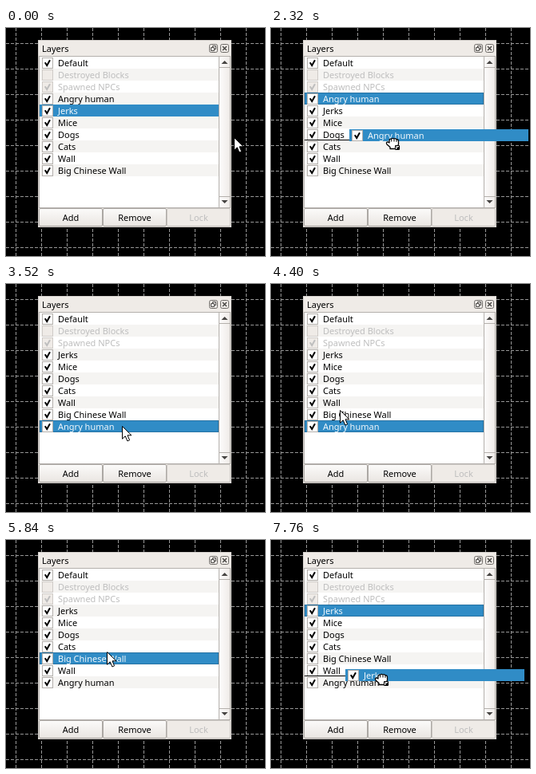
These frames come from a looping animation (324x286 px, 8 s). An HTML page:

```html
<!DOCTYPE html>
<html lang="en">
<head>
<meta charset="utf-8">
<title>Layers panel</title>
<style>
  html, body { margin: 0; width: 100%; height: 100%; overflow: hidden; background: #000; }
  #stage {
    position: relative; width: 324px; height: 286px; overflow: hidden; background: #000;
    font: 11px/15px "Noto Sans", "Open Sans", sans-serif; color: #000; cursor: default;
  }
  #stage div, #stage svg { position: absolute; box-sizing: border-box; }
  #grid { left: 0; top: 0; }
  #grid path { fill: none; stroke: #969696; stroke-dasharray: 4 2; }
  #dock { left: 40px; top: 15px; width: 242px; height: 235px; background: #efebe7; border: 1px solid #d6d2ce; }
  #title { left: 45px; top: 18px; }
  #titleLine { left: 41px; top: 35px; width: 240px; height: 1px; background: #b4b0ac; }
  #tools { left: 253px; top: 19px; }
  #list { left: 41px; top: 36px; width: 225px; height: 190px; background: #fff; border-left: 1px solid #b4b0ac; border-bottom: 1px solid #b4b0ac; }
  .row { left: 42px; width: 224px; height: 15px; padding-left: 23px; white-space: pre; }
  .row.alt { background: #f5f4f2; }
  .row.off { color: #bebebe; }
  .row.on { background: #308cc6; color: #f2f8fc; }
  .row.focus { box-shadow: inset 0 0 0 1px #2672a3; }
  .box { left: 3px; top: 1px; width: 14px; height: 14px; background: #fff; border: 1px solid #b3afab; }
  .off .box { background: #efebe7; border-color: #cfcbc7; }
  .box svg { left: 0; top: 0; }
  .box path { fill: none; stroke: #000; stroke-width: 2; }
  .off .box path { stroke: #bebebe; }
  .empty svg { display: none; }
  #bar { left: 266px; top: 36px; width: 15px; height: 190px; background: #f3f0ed; border: 1px solid #b4b0ac; border-top: 0; }
  #bar div { left: 0; width: 13px; background: linear-gradient(90deg, #fdfcfc, #efebe8); }
  #bar svg { left: 0; top: 0; }
  .btn { top: 226px; height: 23px; text-align: center; line-height: 22px; border: 1px solid #aca8a4; border-radius: 2px; background: linear-gradient(#fbfaf9, #eae6e2); }
  .btn.off { color: #bebebe; border-color: #cbc7c3; background: #efebe7; }
  #mark { left: 42px; width: 224px; height: 1px; background: #000; }
  #pointer { left: 0; top: 0; overflow: visible; }
</style>
</head>
<body>
<div id="stage">
  <svg id="grid" width="324" height="286"><path/></svg>
  <div id="dock"></div>
  <div id="title">Layers</div>
  <div id="titleLine"></div>
  <svg id="tools" width="28" height="14" fill="none" stroke="#4b4947">
    <rect x="1.5" y="1.5" width="10" height="10" rx="2" stroke="#6e6b68"/>
    <rect x="15.5" y="1.5" width="10" height="10" rx="2" stroke="#6e6b68"/>
    <path d="M5.5 5.5V3.5H9.5V7.5H7.5M3.5 5.5H7.5V9.5H3.5Z"/>
    <path d="M18 4L23 9M23 4L18 9" stroke-width="1.5"/>
  </svg>
  <div id="list"></div>
  <div id="rows"></div>
  <div id="mark"></div>
  <div id="bar">
    <div style="top:0;height:14px;border-bottom:1px solid #b4b0ac"></div>
    <div style="top:14px;height:161px"></div>
    <div style="top:175px;height:14px;border-top:1px solid #b4b0ac"></div>
    <svg width="13" height="189" fill="#454341"><path d="M2.5 9L6.5 5L10.5 9ZM2.5 180L6.5 184L10.5 180Z"/></svg>
  </div>
  <div class="btn" style="left:41px;width:80px">Add</div>
  <div class="btn" style="left:121px;width:80px">Remove</div>
  <div class="btn off" style="left:201px;width:80px">Lock</div>
  <div id="held"></div>
  <svg id="pointer" width="24" height="24">
    <g id="arrow" stroke="#000" stroke-linejoin="round">
      <path fill="#fff" d="M.5 .5V16.3L4.2 12.8L6.9 19L9.6 17.8L7 11.8H12Z"/>
    </g>
    <g id="deny" fill="none" stroke="#000">
      <circle cx="14" cy="15.5" r="4.2" fill="#fff" stroke="#fff"/>
      <circle cx="14" cy="15.5" r="3.2" stroke-width="1.6"/>
      <path d="M11.8 13.3L16.2 17.7" stroke-width="1.4"/>
    </g>
    <g id="hand" stroke="#000" stroke-linejoin="round">
      <path fill="#fff" stroke-width="1.3" d="M-4 4Q-4 .3 -1.5 1.3Q0 -.5 2 1Q4 0 5 1.8Q7.5 1.5 7.5 4V8L5.5 11V13.5H-3V11.5L-7 8Q-8.5 5.2 -6 4.8L-4 6Z"/>
      <path fill="none" d="M-1.3 2V4.5M2 1.5V4.5M5 2.2V4.8"/>
      <rect x="3.5" y="9.5" width="5" height="5" fill="#fff"/>
      <path d="M4.5 10.5L7.5 13.5M7.5 11V13.5H5"/>
    </g>
  </svg>
</div>
<script>
const LOOP = 8000, STEP = 80, TOP = 36, ROW = 15, LEFT = 42;
const $ = id => document.getElementById(id);

// Pointer path: time, x, y, and 1 for an eased arrival
const path = [
  [480, 285, 136.5], [1360, 90, 95, 1], [1440, 95, 88], [1600, 95, 88],
  [1680, 102, 88], [1760, 109, 92], [2240, 151, 134], [2320, 152, 138],
  [2480, 150, 155], [2880, 149, 172], [3040, 149, 172], [3120, 147, 178],
  [3360, 147, 178], [3440, 147, 179], [3520, 145, 178], [4240, 96, 149, 1],
  [4400, 86, 158], [4480, 86, 158], [4640, 87, 166], [4800, 87, 166],
  [5040, 109, 159], [5120, 111, 153], [5520, 126, 140], [5920, 126, 140],
  [6400, 84, 91, 1], [6560, 87, 87], [6640, 87, 87], [6800, 98, 92],
  [6880, 103, 99], [7520, 129, 151], [7680, 138, 168]
];

// Each drag: press, lift, allowed and drop times, item, grip in the row, row after the drop
const drags = [
  { press: 1680, lift: 1840, allow: 1920, drop: 3440, item: "Angry human", grip: [53, 7], to: 9 },
  { press: 4880, lift: 4960, allow: 5200, drop: 5840, item: "Big Chinese Wall", grip: [45, 10], to: 7 },
  { press: 6720, lift: 6800, allow: 6880, drop: 8000, item: "Jerks", grip: [45, 6], to: 8 }
];
const names = ["Default", "Destroyed Blocks", "Spawned NPCs", "Angry human", "Jerks",
  "Mice", "Dogs", "Cats", "Wall", "Big Chinese Wall"];

const rowHtml = name =>
  `<div class="box"><svg width="12" height="12"><path d="M2.8 5.3L5.2 9L9 2.2"/></svg></div>${name}`;

function pointerAt(t) {
  const i = path.findIndex(k => k[0] > t);
  if (i === 0) return path[0].slice(1, 3);
  if (i < 0) return path[path.length - 1].slice(1, 3);
  const a = path[i - 1], b = path[i];
  let p = (t - a[0]) / (b[0] - a[0]);
  if (b[3]) p = p * p * (3 - 2 * p);
  return [a[1] + (b[1] - a[1]) * p, a[2] + (b[2] - a[2]) * p];
}

function orderAt(t) {
  const order = names.slice();
  for (const d of drags) if (t >= d.drop) {
    order.splice(order.indexOf(d.item), 1);
    order.splice(d.to, 0, d.item);
  }
  return order;
}

function drawRows(order, chosen, focus) {
  $("rows").innerHTML = order.map((name, i) => {
    const cls = ["row"];
    if (i % 2) cls.push("alt");
    if (i === 1 || i === 2) cls.push("off");
    if (i === 1) cls.push("empty");
    if (name === chosen) cls.push("on");
    if (name === chosen && focus) cls.push("focus");
    return `<div class="${cls.join(" ")}" style="top:${TOP + ROW * i}px">${rowHtml(name)}</div>`;
  }).join("");
}

const show = (id, on) => { $(id).style.display = on ? "" : "none"; };

let lastRows = "", lastHeld = "";
function draw(t) {
  const pressed = drags.filter(d => t >= d.press).pop();
  const order = orderAt(t), chosen = pressed ? pressed.item : "Jerks";
  const key = order + chosen + !!pressed;
  if (key !== lastRows) {
    drawRows(order, chosen, !!pressed);
    lastRows = key;
  }

  const [x, y] = pointerAt(t).map(Math.round);
  const lifted = !!pressed && t >= pressed.lift && t < pressed.drop;
  const allowed = lifted && t >= pressed.allow;
  show("held", lifted);
  show("mark", allowed);
  show("hand", allowed);
  show("arrow", !allowed);
  show("deny", lifted && !allowed);
  $("pointer").style.transform = `translate(${x}px, ${y}px)`;

  if (lifted) {
    // The carried row trails the pointer by one step
    const [hx, hy] = pointerAt(t - STEP);
    if (lastHeld !== pressed.item) {
      $("held").className = "row on";
      $("held").innerHTML = rowHtml(pressed.item);
      lastHeld = pressed.item;
    }
    $("held").style.left = Math.round(hx - pressed.grip[0]) + "px";
    $("held").style.top = Math.round(hy - pressed.grip[1]) + "px";
    $("mark").style.top = TOP - 1 + ROW * Math.round((y - TOP) / ROW) + "px";
  }
}

let lines = "";
for (let x = 12.5; x < 324; x += 32) lines += `M${x} 0V286`;
for (let y = 19.5; y < 286; y += 32) lines += `M0 ${y}H324`;
document.querySelector("#grid path").setAttribute("d", lines);

function tick() {
  const t = performance.now() % LOOP;
  draw(Math.floor(t / STEP) * STEP);
  requestAnimationFrame(tick);
}
tick();
</script>
</body>
</html>
```
